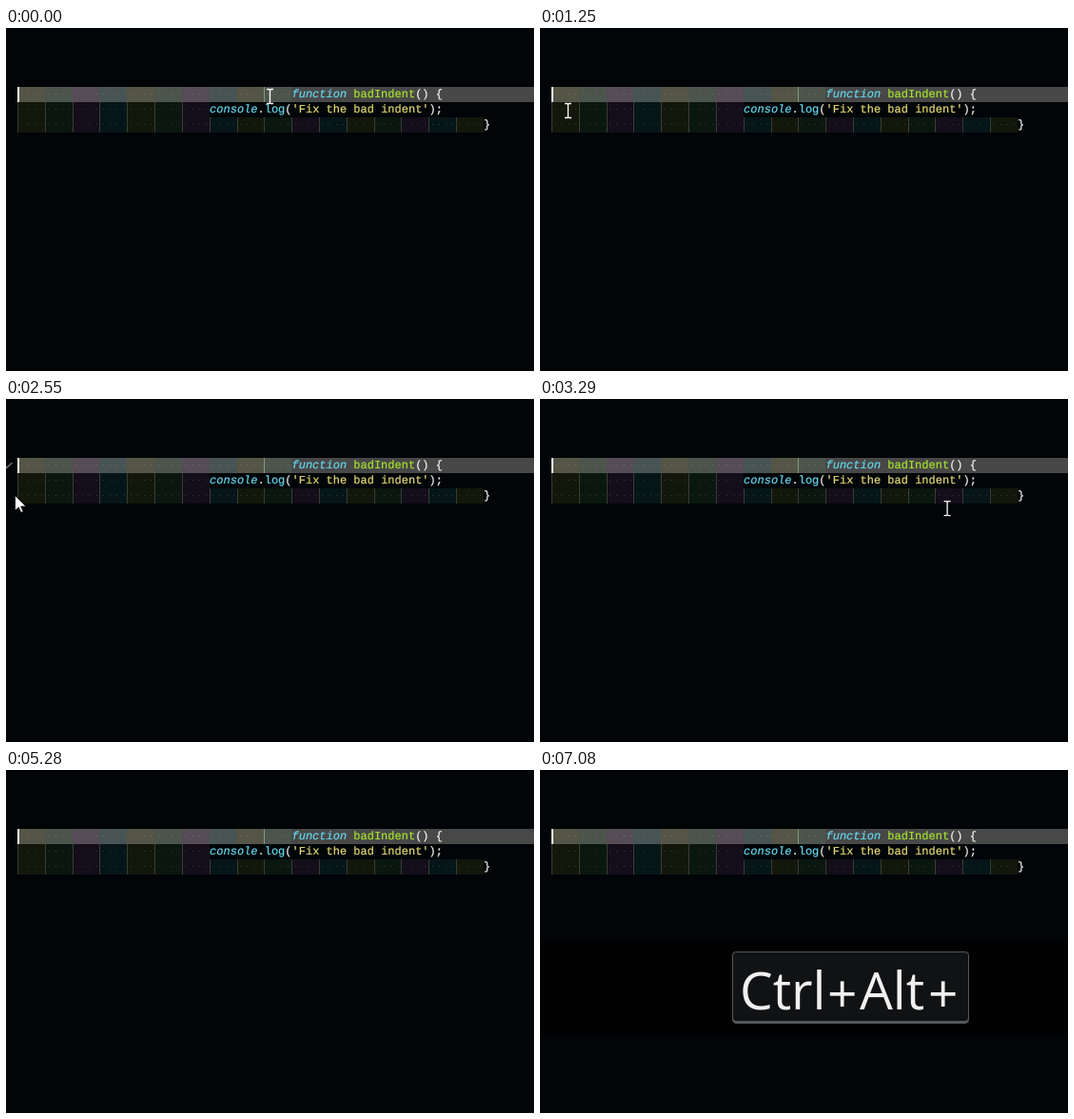
An HTML page for the animation above (8 s loop, 555 px wide and 361 px high).

```html
<!DOCTYPE html>
<html lang="en">
<head>
<meta charset="utf-8">
<title>Bad indent</title>
<style>
  html, body { margin: 0; width: 100%; height: 100%; overflow: hidden; background: #010508; }
  svg { display: block; }
  text { white-space: pre; }
  .code {
    font: 12px "Liberation Mono", "Courier New", monospace;
    text-rendering: geometricPrecision;
    color: #f8f8f2;
  }
  .code text, .code tspan { fill: currentColor; stroke: currentColor; stroke-width: 0.2; }
  .kw { color: #66d9ef; font-style: italic; }
  .call { color: #66d9ef; }
  .fn { color: #a6e22e; }
  .str { color: #e6db74; }
  .key { font: 55px "Open Sans", "Noto Sans", sans-serif; fill: #f0f0f0; }
</style>
</head>
<body>
<svg width="555" height="361" viewBox="0 0 555 361">
  <rect x="12" y="62" width="543" height="16" fill="#484848"/>
  <g id="indents" shape-rendering="crispEdges"></g>
  <g class="code">
    <text x="300.5" y="73"><tspan class="kw">function</tspan> <tspan class="fn">badIndent</tspan>() {</text>
    <text x="214.1" y="89"><tspan class="kw">console</tspan>.<tspan class="call">log</tspan>(<tspan class="str">'Fix the bad indent'</tspan>);</text>
    <text x="502.1" y="105">}</text>
  </g>
  <rect x="12" y="62" width="2" height="16" fill="#f8f8f0"/>
  <path id="fold" d="M-4 68 L0.5 72.5 L6.5 67" fill="none" stroke="#777" stroke-width="1.4"/>
  <path id="beam" d="M-3.5 -7.5 H-1 L0 -6.5 L1 -7.5 H3.5 M0 -6.5 V6.5 M-3.5 7.5 H-1 L0 6.5 L1 7.5 H3.5"
    fill="none" stroke="#fff" stroke-width="1.3"/>
  <path id="arrow" d="M0 0 V16 L3.7 12.5 L6.2 18 L8.7 17 L6.2 11.6 H11.5 Z"
    fill="#fff" stroke="#000" stroke-width="0.8"/>
  <g id="keys">
    <rect y="179" width="555" height="99" fill="#020203"/>
    <rect id="base" y="191" height="76" rx="4.5" fill="#555657"/>
    <rect id="face" y="192" height="72" rx="3.5" fill="#111214"/>
    <g id="label" class="key">
      <text x="8" y="252">Ctrl</text>
      <text x="100" y="255">+</text>
      <g id="alt">
        <text x="134" y="252">Alt</text>
        <text x="206" y="255">+</text>
      </g>
    </g>
  </g>
</svg>
<script>
const LOOP = 8000;
const LEFT = 12.57, CELL = 28.8047, ROW = 16;
const $ = id => document.getElementById(id);

function add(parent, tag, attrs) {
  const el = document.createElementNS("http://www.w3.org/2000/svg", tag);
  for (const name in attrs) el.setAttribute(name, attrs[name]);
  parent.append(el);
}

// Rainbow indents with whitespace dots; the active line has only its last guide.
const tints = ["255,255,64", "127,255,127", "255,127,255", "79,236,236"];
[10, 7, 17].forEach((count, row) => {
  const y = 62 + row * ROW;
  const edge = i => Math.floor(LEFT + i * CELL);
  for (let i = 0; i < count; i++) {
    const x = edge(i);
    add($("indents"), "rect", { x, y, width: edge(i + 1) - x, height: ROW, fill: `rgba(${tints[i % 4]},.07)` });
    if (row || i === count - 1) {
      add($("indents"), "rect", { x, y, width: 1, height: ROW, fill: row ? "#3b3c34" : "#7c9a80" });
    }
  }
  add($("indents"), "line", {
    x1: LEFT + 3.1, x2: LEFT + count * CELL, y1: y + 7.5, y2: y + 7.5,
    stroke: "rgba(255,255,255,.16)", "stroke-dasharray": "1 6.2"
  });
});

// Each pointer move: start, end, steps, target x, target y, sag of the path.
const moves = [
  [30, 150, 3, 301.5, 72],
  [410, 920, 12, 42.5, 87],
  [1070, 1250, 4, 29.5, 87],
  [1380, 1840, 10, 223.5, 91],
  [1890, 2550, 14, 9.5, 101.5],
  [2600, 2680, 2, 8, 101],
  [2730, 3470, 17, 496.5, 112, 11],
  [3700, 3700, 1, 498.5, 111],
  [3880, 4250, 8, 235.5, 89.5],
  [4300, 4670, 9, 204.5, 71],
  [4720, 5230, 12, 26.5, 22]
];

const ease = p => p * p * (3 - 2 * p);

function pointerAt(t) {
  let x = 277.5, y = 72;
  for (const [start, end, steps, toX, toY, sag = 0] of moves) {
    if (t < start) break;
    const gap = (end - start) / (steps - 1) || 1;
    const step = Math.floor((t - start) / gap + 0.001) + 1;
    const p = ease(Math.min(1, step / steps));
    x += (toX - x) * p;
    y += (toY - y) * p + sag * Math.sin(Math.PI * p);
  }
  return [x, y];
}

const show = (id, on) => $(id).setAttribute("visibility", on ? "visible" : "hidden");

function drawPointer(t) {
  const [x, y] = pointerAt(t);
  const visible = t < 5280, gutter = x < 12;
  for (const id of ["beam", "arrow"]) $(id).setAttribute("transform", `translate(${x} ${y})`);
  show("beam", visible && !gutter);
  show("arrow", visible && gutter);
  show("fold", visible && gutter);
}

function drawKeys(t) {
  const both = t >= 7080;
  const x = both ? 202 : 255, width = both ? 249 : 143;
  const step = Math.floor((t - 6800) / 56 + 0.001);
  $("keys").setAttribute("opacity", t < 6800 ? 0 : Math.min(1, 0.17 + step * 0.21));
  $("base").setAttribute("x", x);
  $("base").setAttribute("width", width);
  $("face").setAttribute("x", x + 1);
  $("face").setAttribute("width", width - 2);
  $("label").setAttribute("transform", `translate(${x} 0)`);
  show("alt", both);
}

function frame() {
  const t = performance.now() % LOOP;
  drawPointer(t);
  drawKeys(t);
  requestAnimationFrame(frame);
}
frame();
</script>
</body>
</html>
```
